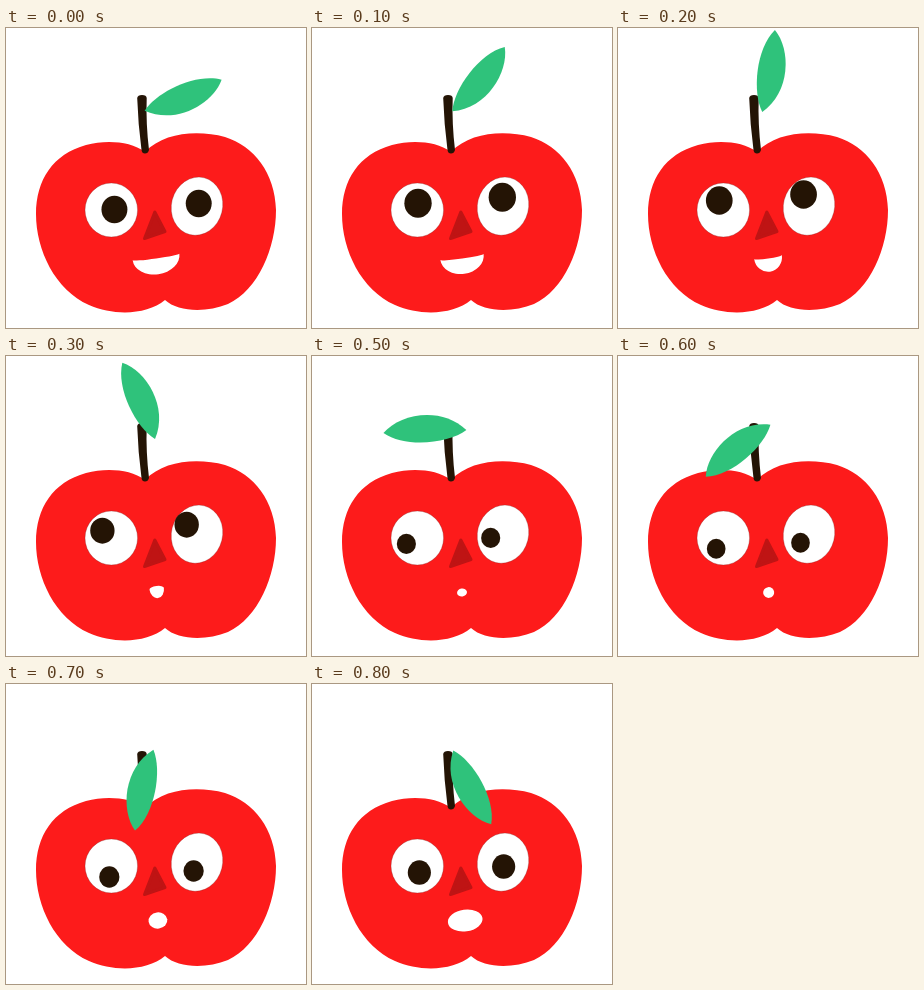
Animation of 300x300 px, one loop 900 ms. Source, as an HTML page with a canvas:

```html
<!DOCTYPE html>
<html lang="en">
<head>
<meta charset="utf-8">
<title>Apple with a turning leaf</title>
<style>
  html, body { margin: 0; width: 100%; height: 100%; overflow: hidden; background: #fff; }
  canvas { display: block; width: 100%; height: 100%; }
</style>
</head>
<body>
<canvas id="stage" width="300" height="300"></canvas>
<script>
const ctx = document.getElementById('stage').getContext('2d');
const STEP = 100, STEPS = 9;
const RED = '#fd1b1b', GREEN = '#2fc27b', DARK = '#241405', NOSE = '#bf1414';

const APPLE = new Path2D(
  'M139 124C124 113 100 112 80 117C47 126 30 152 30 186C30 222 49 262 83 277' +
  'C108 288 141 287 159 272C172 284 200 285 222 276C252 262 270 220 270 182' +
  'C269 145 248 118 219 109C192 102 158 104 139 124Z');
const STEM = new Path2D(
  'M131.2 70Q131.7 67 136 67Q140.5 67 140.7 70Q139.8 95 143 122Q142 125.5 139 125.5' +
  'Q136 125.5 135.5 122Q132 95 131.2 70Z');
const LEAF = new Path2D('M-9 0C9 -13 53 -16 74 0C57 19 15 25 -9 0Z');
const NOSE_SHAPE = new Path2D('M148.8 184L138.5 210.5L159 203.5Z');

const rad = degrees => degrees * Math.PI / 180;
// Cosine over the loop, peaking at step `peak`
const wave = (n, peak) => Math.cos(2 * Math.PI * (n - peak) / STEPS);

function fill(path, color) {
  ctx.fillStyle = color;
  ctx.fill(path);
}

function outline(path, color, width) {
  ctx.strokeStyle = color;
  ctx.lineWidth = width;
  ctx.lineJoin = 'round';
  ctx.stroke(path);
}

function oval(x, y, rx, ry, color, tilt = 0) {
  const p = new Path2D();
  p.ellipse(x, y, rx, ry, tilt, 0, 2 * Math.PI);
  fill(p, color);
  return p;
}

function placed(x, y, degrees, path, color) {
  ctx.save();
  ctx.translate(x, y);
  ctx.rotate(rad(degrees));
  fill(path, color);
  ctx.restore();
}

function eyes(n) {
  const rim = 'rgba(130, 30, 30, 0.4)';
  outline(oval(105.3, 182, 26.3, 27, '#fff'), rim, 0.8);
  outline(oval(191, 178.2, 25.6, 29.3, '#fff', 0.25), rim, 0.8);

  // Both pupils circle together once per loop
  const gaze = rad(360 * n / STEPS + 8);
  const x = 101 + 7.5 * Math.cos(gaze), y = 183 - 10.5 * Math.sin(gaze);
  const r = 11.5 + 2.2 * wave(n, 1.2);
  oval(x, y, r, r * 1.06, DARK);
  oval(x + 84.3, y - 6, r, r * 1.06, DARK);
}

// A smile that shrinks into a small round mouth, then opens again
function mouth(n) {
  const open = (1 + wave(n, 0.3)) / 2;
  const smile = Math.min(1, Math.max(0, 2 - n / 2));
  const round = 4 + 8.5 * open;
  const width = 5 + 19 * open * open;
  const drop = round + 5 * smile;
  const rise = round * (1 - smile) - 1.5 * smile;

  const p = new Path2D();
  p.ellipse(0, 0, width, drop, 0, 0, Math.PI);
  p.ellipse(0, 0, width, Math.abs(rise), 0, Math.PI, 2 * Math.PI, rise < 0);
  placed(150 + 4 * open * (1 - smile), 236.5 - 7.5 * smile, -8, p, '#fff');
}

function leaf(n) {
  const angle = 22 + 28 * n + 0.8 * n * n;
  const sag = Math.exp(-n);
  placed(145.4 + 1.6 * sag, 74.4 + 5 * sag, -angle, LEAF, GREEN);
}

function draw(n) {
  ctx.fillStyle = '#fff';
  ctx.fillRect(0, 0, 300, 300);
  fill(APPLE, RED);
  fill(STEM, DARK);
  eyes(n);
  fill(NOSE_SHAPE, NOSE);
  outline(NOSE_SHAPE, NOSE, 3);
  mouth(n);
  leaf(n);
}

const start = performance.now();
function tick() {
  const elapsed = Math.max(0, performance.now() - start);
  draw(Math.floor(elapsed / STEP) % STEPS);
  requestAnimationFrame(tick);
}
tick();
</script>
</body>
</html>
```
